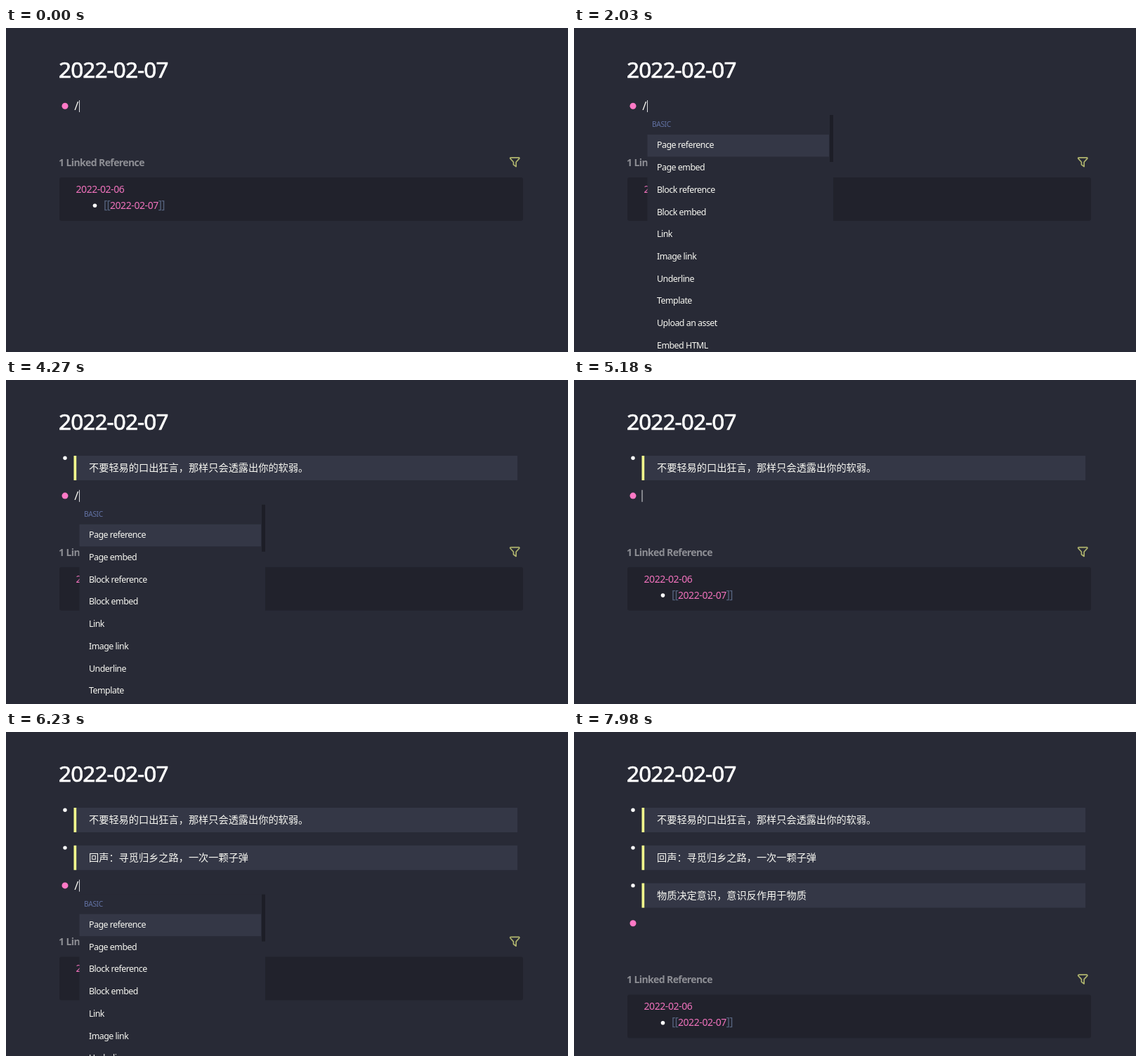
An HTML page for the animation above (8000 ms loop, 800x462 px).

```html
<!DOCTYPE html>
<html lang="zh-CN">
<head>
<meta charset="utf-8">
<title>Journal quotes</title>
<style>
  html, body { margin: 0; width: 100%; height: 100%; overflow: hidden; background: #282a36; }
  svg { display: block; width: 800px; height: 462px; }
  text { font: 13.2px "Noto Sans", "Open Sans", sans-serif; letter-spacing: -.036em; fill: #f8f8f2; }
  .title { font-size: 31.5px; letter-spacing: -.028em; fill: #fff; stroke: #fff; stroke-width: .7px; }
  .cjk { font: 500 14.2px "Noto Sans CJK SC", "Noto Sans CJK", sans-serif; letter-spacing: 0; }
  .slash { font-size: 16.5px; font-weight: 300; }
  .heading { font-size: 14px; font-weight: 700; letter-spacing: -.043em; fill: #8d8e94; }
  .link { font-size: 14px; letter-spacing: -.03em; fill: #f072bc; }
  .bracket { font-size: 16px; font-weight: 300; letter-spacing: -.05em; fill: #56647f; }
  .group { font-size: 10.2px; fill: #6272a4; }
  .item { font-size: 12.4px; letter-spacing: -.04em; }
</style>
</head>
<body>
<svg viewBox="0 0 800 462">
  <rect width="800" height="462" fill="#282a36"/>
  <text class="title" x="75" y="71.3">2022-02-07</text>

  <g id="refs">
    <text class="heading" x="75" y="196.8">1 Linked Reference</text>
    <path transform="translate(713.2 180.2) scale(.92)" fill="none" stroke="#b0b56e" stroke-width="1.8"
          stroke-linejoin="round" d="M5.5 5h13a1 1 0 0 1 .5 1.5l-5 5.5v7l-4-3v-4l-5-5.5a1 1 0 0 1 .5-1.5"/>
    <rect x="76" y="213" width="660" height="62" rx="3" fill="#21222c"/>
    <text class="link" x="99.5" y="234.8">2022-02-06</text>
    <circle cx="126.5" cy="253.3" r="2.8" fill="#fff"/>
    <text class="link" x="139" y="257.8"><tspan class="bracket">[[</tspan>2022-02-07<tspan class="bracket">]]</tspan></text>
  </g>

  <g id="quotes"></g>

  <g id="block">
    <circle cx="84" cy="111.3" r="4.5" fill="#ff79c6"/>
    <text id="slash" class="slash" x="97.3" y="117">/</text>
    <g id="edit">
      <text x="96.5" y="116.5">#+BEGIN_QUOTE</text>
      <text id="draft" class="cjk" x="144" y="139"></text>
      <text x="143.7" y="160.6">#+END_QUOTE</text>
    </g>
    <rect id="cursor" width="1" height="17" fill="#dcdde0"/>
    <g id="menu">
      <rect x="104.5" y="124" width="264.5" height="345" fill="#282a36"/>
      <rect x="364" y="124" width="5" height="67" fill="#1d1e27"/>
      <rect x="104.5" y="152" width="258.5" height="31.5" fill="#343746"/>
      <text class="group" x="111" y="141.2">BASIC</text>
    </g>
  </g>
</svg>
<script>
const LOOP = 8000;
const ROW = 53.8;         // height of a finished quote block
const EDIT_GROWTH = 43.5; // two extra lines while a quote is raw text
const ITEM = 31.72;

const QUOTES = [
  "不要轻易的口出狂言，那样只会透露出你的软弱。",
  "回声：寻觅归乡之路，一次一颗子弹",
  "物质决定意识，意识反作用于物质",
];
const COMMANDS = ["Page reference", "Page embed", "Block reference", "Block embed", "Link",
  "Image link", "Underline", "Template", "Upload an asset", "Embed HTML"];

// [start ms, finished quotes, mode, cursor visible]
const STEPS = [
  [0, 0, "slash", 1],
  [490, 0, "slash", 0],
  [1050, 0, "slash", 1],
  [1470, 0, "menu", 1],
  [2100, 0, "empty", 1],
  [2730, 0, "edit", 1],
  [3360, 1, "empty", 1],
  [3780, 1, "empty", 0],
  [3990, 1, "slash", 1],
  [4060, 1, "menu", 1],
  [4760, 1, "empty", 1],
  [5250, 1, "edit", 1],
  [5530, 2, "empty", 1],
  [5950, 2, "slash", 1],
  [6020, 2, "menu", 1],
  [6510, 2, "empty", 1],
  [7070, 2, "edit", 1],
  [7420, 3, "empty", 1],
  [7910, 3, "empty", 0],
];
const CURSOR_AT = { empty: [96.5, 103], slash: [104, 103], menu: [104, 103], edit: [233, 147.5] };

const $ = id => document.getElementById(id);
const add = (parent, tag, attrs, text = "") => {
  const el = document.createElementNS("http://www.w3.org/2000/svg", tag);
  for (const key in attrs) el.setAttribute(key, attrs[key]);
  el.textContent = text;
  return parent.appendChild(el);
};
const show = (el, on) => { el.style.display = on ? "" : "none"; };
const moveY = (el, y) => el.setAttribute("transform", `translate(0 ${y})`);

const quoteRows = QUOTES.map((quote, i) => {
  const row = add($("quotes"), "g", {});
  moveY(row, i * ROW);
  add(row, "circle", { cx: 84, cy: 111.3, r: 2.7, fill: "#fff" });
  add(row, "rect", { x: 97, y: 108, width: 631, height: 35, fill: "#343746" });
  add(row, "rect", { x: 96.5, y: 108, width: 3.7, height: 35, fill: "#f1fa8c" });
  add(row, "text", { class: "cjk", x: 118, y: 130.3 }, quote);
  return row;
});
COMMANDS.forEach((name, i) =>
  add($("menu"), "text", { class: "item", x: 118, y: 171.4 + i * ITEM }, name));

function render([, done, mode, cursorOn]) {
  const offset = done * ROW;
  const [x, y] = CURSOR_AT[mode];
  quoteRows.forEach((row, i) => show(row, i < done));
  moveY($("block"), offset);
  moveY($("refs"), offset + (mode === "edit" ? EDIT_GROWTH : 0));
  show($("slash"), mode === "slash" || mode === "menu");
  show($("menu"), mode === "menu");
  show($("edit"), mode === "edit");
  $("draft").textContent = QUOTES[done] || "";
  $("cursor").setAttribute("x", x);
  $("cursor").setAttribute("y", y);
  show($("cursor"), cursorOn);
}

let current;
const start = performance.now();
function tick() {
  const time = (performance.now() - start) % LOOP;
  const step = STEPS.findLast(([from]) => from <= time);
  if (step !== current) render(current = step);
  requestAnimationFrame(tick);
}
tick();
</script>
</body>
</html>
```
